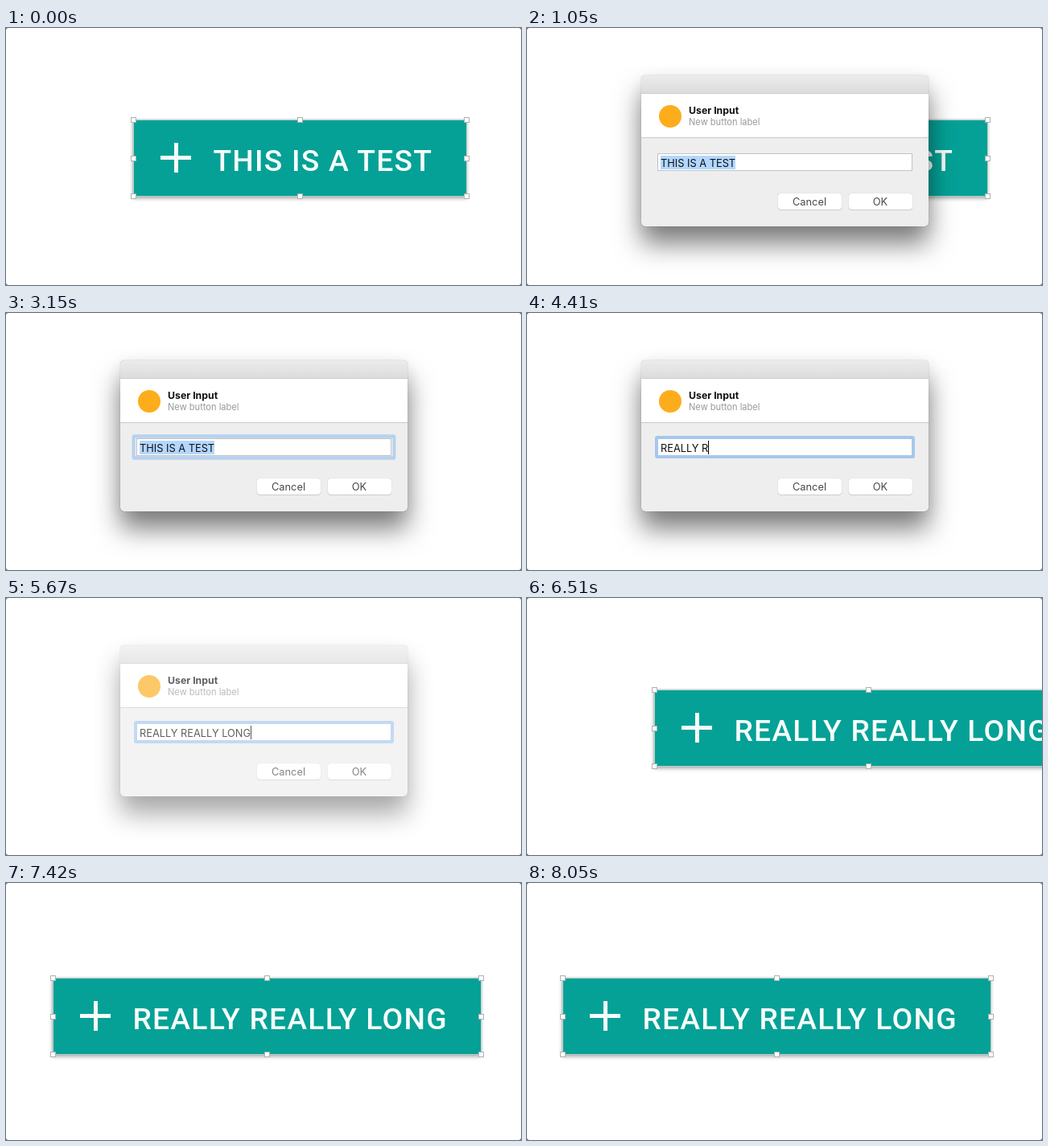
Write an HTML page that moves like this. It is 640 by 320 pixels and loops after 8.12 s.

```html
<!DOCTYPE html>
<html lang="en">
<head>
<meta charset="utf-8">
<title>Button label dialog</title>
<style>
html, body { margin: 0; width: 100%; height: 100%; overflow: hidden; background: #555; }
#stage { position: relative; width: 640px; height: 320px; overflow: hidden; background: #fff; border-radius: 3px; }
#stage div { position: absolute; box-sizing: border-box; white-space: pre; }

#button { left: 158px; top: 114px; height: 95px; background: #05a196; box-shadow: 0 3px 5px rgba(0,0,0,.36), 0 0 2px rgba(0,0,0,.25); }
#outline { inset: 0 -1px -1px 0; border: 1px solid #b9cfcc; }
#label { left: 99.5px; top: 28.6px; font: 500 37.3px/44px Roboto, sans-serif; letter-spacing: 1.2px; color: #f6fcfb; }
.bar { background: #f6fcfb; }
.handle { width: 7px; height: 7px; margin: -3px; background: #fff; border: 1px solid #a9b3b2; }

#dialog { left: 142px; top: 59px; width: 357px; height: 188px; border-radius: 5px; background: #eee;
  box-shadow: 0 22px 32px rgba(0,0,0,.5), 0 4px 20px rgba(0,0,0,.06), 0 0 1px rgba(0,0,0,.5); font: 12.8px/16px Inter, sans-serif; color: #111; }
#bar { left: 0; top: 0; width: 357px; height: 23px; border-radius: 5px 5px 0 0; border-bottom: 1px solid #cfcfcf; background: linear-gradient(#ececec, #dcdcdc); }
#head { left: 0; top: 22px; width: 357px; height: 56px; background: #fff; border-top: 1px solid #cfcfcf; border-bottom: 1px solid #c9c9c9; }
#icon { left: 22px; top: 37px; width: 28px; height: 28px; border-radius: 50%; background: #fdad1c; }
#title { left: 59px; top: 36px; font-size: 12.3px; font-weight: 700; }
#note { left: 59px; top: 50.4px; font-size: 11.1px; color: #999; }
#field { left: 20px; top: 97px; width: 317px; height: 22px; background: #fff; border: 1px solid #c3c3c3; }
#ring { left: 17px; top: 94px; width: 323px; height: 28px; border: 4px solid #a5c7ee; border-radius: 3px; }
#entry { left: 24px; top: 100px; height: 17px; line-height: 19.5px; }
.key { top: 147px; width: 79px; height: 20px; line-height: 21px; text-align: center; color: #484848;
  background: #fff; border-radius: 4px; box-shadow: 0 0 1px rgba(0,0,0,.25), 0 1px 1px rgba(0,0,0,.12); }
</style>
</head>
<body>
<div id="stage">
  <div id="button">
    <div id="outline"></div>
    <div class="bar" style="left:34px;top:45px;width:38px;height:5px"></div>
    <div class="bar" style="left:50.5px;top:29px;width:5px;height:37px"></div>
    <div id="label"></div>
  </div>
  <div id="dialog">
    <div id="bar"></div>
    <div id="head"></div>
    <div id="icon"></div>
    <div id="title">User Input</div>
    <div id="note">New button label</div>
    <div id="field"></div>
    <div id="ring"></div>
    <div id="entry"></div>
    <div class="key" style="left:169.5px">Cancel</div>
    <div class="key" style="left:257.5px">OK</div>
  </div>
</div>
<script>
const LOOP = 8120, STEP = 70;
const SHORT = { text: 'THIS IS A TEST', width: 414 };
const LONG = { text: 'REALLY REALLY LONG', width: 532 };
const FADE = 140;
const dialogs = [[1050, 2100], [2940, 5670]];
const typing = { start: 3675, perKey: 105 };
// time, x offset, y offset
const pan = [
  [6510, 0, 0], [6580, -4, 1], [6720, -19, 3], [6860, -31, 4], [6930, -35, 4], [7070, -43, 4],
  [7140, -52, 4], [7280, -80, 4], [7350, -92, 4], [7490, -108, 4], [7630, -114, 4]
];

const $ = id => document.getElementById(id);
const clamp = v => Math.max(0, Math.min(1, v));
const button = $('button'), label = $('label'), dialog = $('dialog'), ring = $('ring'), entry = $('entry');

for (const x of [0, 50, 100]) for (const y of [0, 50, 100]) {
  if (x === 50 && y === 50) continue;
  const h = document.createElement('div');
  h.className = 'handle';
  h.style.left = x + '%';
  h.style.top = y + '%';
  button.append(h);
}

function panAt(t) {
  const i = pan.findIndex(p => p[0] > t);
  if (i === 0) return [0, 0];
  if (i < 0) return pan[pan.length - 1].slice(1);
  const a = pan[i - 1], b = pan[i], k = (t - a[0]) / (b[0] - a[0]);
  return [1, 2].map(n => a[n] + (b[n] - a[n]) * k);
}

function drawButton(t) {
  const kind = t < 5740 ? SHORT : LONG;
  const [x, y] = panAt(t);
  button.style.display = t >= 2450 && t < 5740 ? 'none' : '';
  button.style.width = kind.width + 'px';
  button.style.transform = `translate(${x}px, ${y}px)`;
  label.textContent = kind.text;
}

function drawDialog(t) {
  const span = dialogs.find(([a, b]) => t >= a && t < b + FADE);
  dialog.style.display = span ? '' : 'none';
  if (!span) return;
  dialog.style.opacity = t < span[1] ? 1 : clamp(1 - (t - span[1] + STEP) / (FADE + STEP));

  const focus = clamp((t - span[0]) / 280);
  ring.style.opacity = focus;
  ring.style.transform = `scale(${1 + .06 * (1 - focus)}, ${1 + .5 * (1 - focus)})`;

  const typed = t >= typing.start ? Math.floor((t - typing.start) / typing.perKey) + 1 : 0;
  entry.textContent = typed ? LONG.text.slice(0, typed) : SHORT.text;
  entry.style.background = typed ? 'none' : '#b3d7ff';
  entry.style.borderRight = typed ? '1px solid #000' : 'none';
}

function frame() {
  const t = Math.floor(performance.now() % LOOP / STEP) * STEP;
  drawButton(t);
  drawDialog(t);
  requestAnimationFrame(frame);
}
frame();
</script>
</body>
</html>
```
